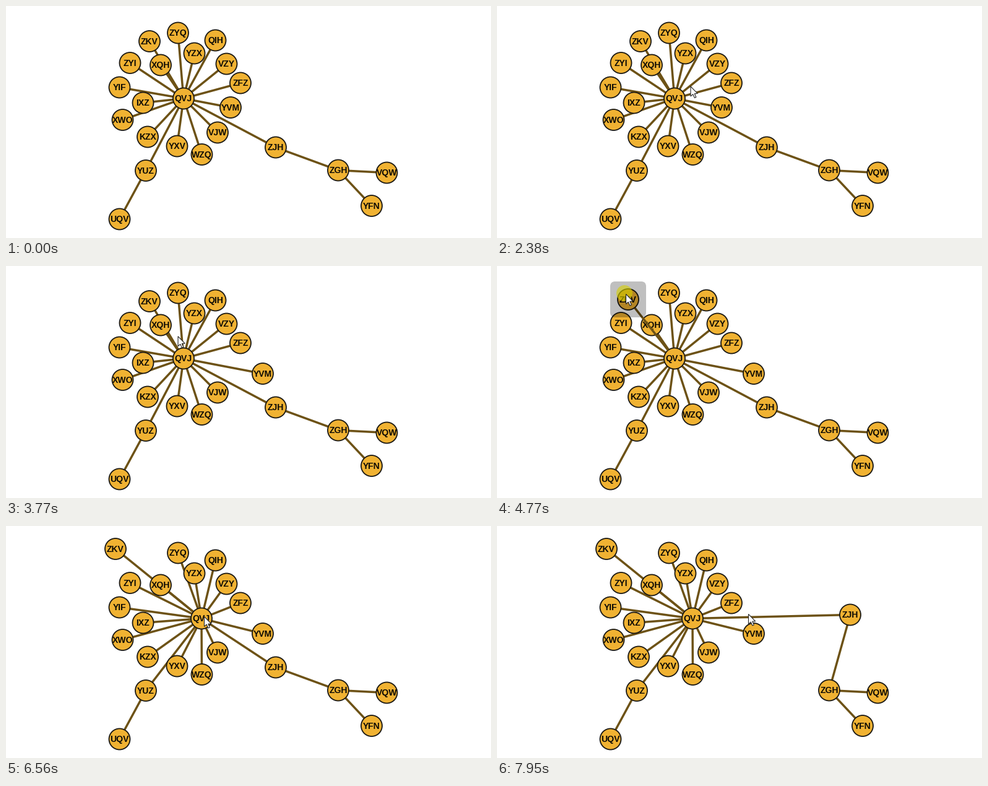
These frames come from a looping animation (784 by 375 pixels, 8000 ms). A matplotlib script:

```python
import numpy as np
import matplotlib.pyplot as plt
from matplotlib.animation import FuncAnimation
from matplotlib.patches import Circle, FancyBboxPatch, Polygon

W, H, DPI = 784, 375, 80
PX = 72 / DPI  # points per pixel
LOOP, INTERVAL = 8000, 25
START, STEP = 840, 77.28  # the pointer is sampled every STEP ms

GOLD, BROWN, INK = "#f0b232", "#6d5216", "#1a1813"
R, PAD = 17, 29

HUB = "QVJ"
NODES = {
    HUB: (287, 149.5),
    "ZYQ": (278, 43.5), "ZKV": (232, 57), "QIH": (338.5, 55.5),
    "YZX": (304.5, 76.5), "ZYI": (200.5, 92), "XQH": (250, 95.5),
    "VZY": (356.5, 93.5), "YIF": (183.5, 131.5), "ZFZ": (379, 124.5),
    "IXZ": (221.5, 156.5), "YVM": (363, 164), "XWO": (188.5, 184),
    "KZX": (229, 211.5), "VJW": (342, 204.5), "YXV": (276.5, 226.5),
    "WZQ": (316.5, 240), "ZJH": (436, 228.5), "YUZ": (226, 266),
    "ZGH": (537, 265.5), "VQW": (615.5, 269.5), "YFN": (591, 323),
    "UQV": (183.5, 344.5),
}
CHAINS = {"ZGH": "ZJH", "VQW": "ZGH", "YFN": "ZGH", "UQV": "YUZ"}
EDGES = [(CHAINS.get(n, HUB), n) for n in NODES if n != HUB]

# pointer: step, x, y
PATH = np.array([
    (0, 527, 357), (10, 393, 230), (15, 255, 98), (17, 255, 98),
    (23, 370, 161), (24, 370, 161), (27, 394, 168), (31, 422, 171),
    (34, 422, 171), (40, 227, 93), (44, 289, 147), (48, 228, 48),
    (49, 228, 48), (51, 208, 45), (55, 173, 30), (56, 173, 28),
    (57, 173, 28), (62, 314, 160), (64, 306, 155), (66, 291, 146),
    (67, 293, 146), (71, 320, 146), (75, 320, 146), (78, 432, 258),
    (80, 440, 225), (81, 440, 225), (86, 565, 145), (88, 575, 140),
    (90, 575, 140), (92, 406, 142),
], float)
# node, press step, release step
DRAGS = [("YVM", 23, 34), ("ZKV", 48, 57), (HUB, 66, 74), ("ZJH", 80, 90)]

KEYS, STOPS = PATH[:, 0], PATH[:, 1:]


def slopes():
    """Harmonic-mean tangents: smooth, without overshoot."""
    d = np.diff(STOPS, axis=0) / np.diff(KEYS)[:, None]
    a, b = d[:-1], d[1:]
    same = a * b > 0
    mid = np.where(same, 2 * a * b / np.where(same, a + b, 1), 0)
    return np.vstack([d[:1], mid, d[-1:]])


SLOPES = slopes()


def mouse_at(k):
    k = np.clip(k, KEYS[0], KEYS[-1])
    i = min(np.searchsorted(KEYS, k, side="right") - 1, len(KEYS) - 2)
    h = KEYS[i + 1] - KEYS[i]
    u = (k - KEYS[i]) / h
    ease = u * u * (3 - 2 * u)
    return (STOPS[i] * (1 - ease) + STOPS[i + 1] * ease
            + h * u * (1 - u) * ((1 - u) * SLOPES[i] - u * SLOPES[i + 1]))


fig = plt.figure(figsize=(W / DPI, H / DPI), dpi=DPI, facecolor="white")
ax = fig.add_axes([0, 0, 1, 1])
ax.set_xlim(0, W)
ax.set_ylim(H, 0)
ax.axis("off")

lines = {e: ax.plot([], [], color=BROWN, lw=3.5 * PX,
                    solid_capstyle="butt")[0] for e in EDGES}
discs, labels = {}, {}
for name, pos in NODES.items():
    discs[name] = ax.add_patch(Circle(pos, R, fc=GOLD, ec=INK, lw=1.8 * PX))
    labels[name] = ax.text(*pos, name, ha="center", va="baseline",
                           family="Liberation Sans", weight="bold",
                           size=14 * PX, color="#0c0a04")

halo = ax.add_patch(FancyBboxPatch(
    (0, 0), 2 * PAD, 2 * PAD, boxstyle="round,pad=0,rounding_size=8",
    fc="black", ec="none", alpha=0.25, zorder=7))
glow = ax.add_patch(Circle((0, 0), 13, fc="#d8d000", ec="none",
                           alpha=0.6, zorder=8))
ARROW = np.array([(0, 0), (0, 16), (3.7, 12.6), (6.4, 18.5), (8.9, 17.4),
                  (6.3, 11.7), (11.2, 11.5)])
pointer = ax.add_patch(Polygon(ARROW, fc="white", ec="#222222",
                               lw=1.1 * PX, zorder=9))


def draw(frame):
    k = int(np.floor((frame * INTERVAL + 20 - START) / STEP + 0.2))
    mouse = mouse_at(k)
    spots = {n: np.array(p, float) for n, p in NODES.items()}
    held = None
    for name, press, release in DRAGS:
        spots[name] += mouse_at(np.clip(k, press, release)) - mouse_at(press)
        if press <= k < release:
            held = name

    for (a, b), line in lines.items():
        p, q = spots[a], spots[b]
        gap = (q - p) / np.hypot(*(q - p)) * R
        line.set_data(*np.array([p + gap, q - gap]).T)
        line.set_zorder(4 if held in (a, b) else 1)
    for name, (x, y) in spots.items():
        top = name == held
        discs[name].center = x, y
        discs[name].set_zorder(5 if top else 2)
        labels[name].set_position((x, y + 4.7))
        labels[name].set_zorder(6 if top else 3)

    halo.set_visible(held is not None)
    glow.set_visible(held is not None)
    if held:
        x, y = spots[held]
        halo.set_x(x - PAD)
        halo.set_y(y - PAD)
        glow.center = mouse - (2, 1)
    pointer.set_visible(k >= 0)
    pointer.set_xy(ARROW + mouse + 0.5)
    return []


anim = FuncAnimation(fig, draw, frames=LOOP // INTERVAL, interval=INTERVAL,
                     repeat=True, repeat_delay=0, blit=False)
plt.show()
```
